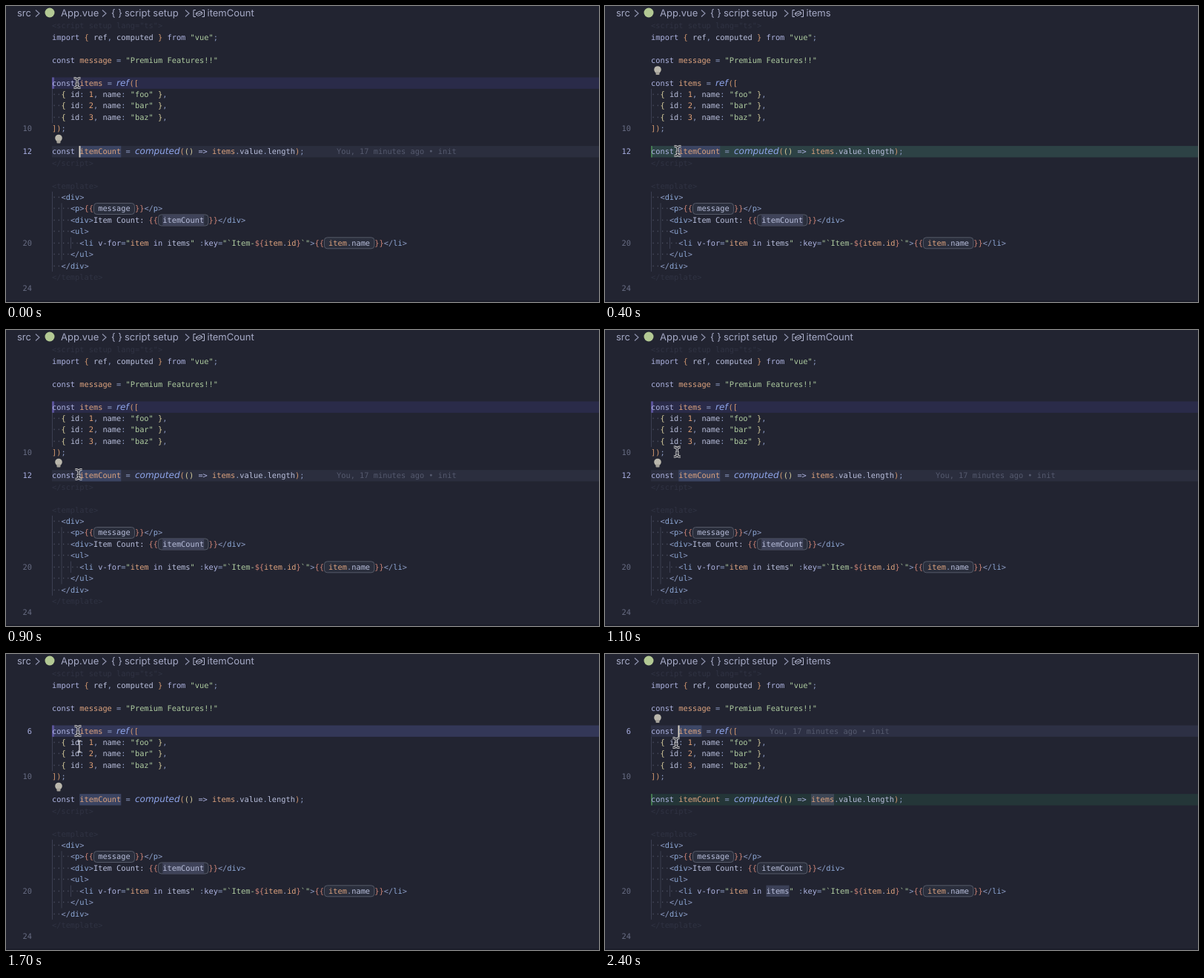
Recreate the animation shown at these times as an HTML page. Size 800 by 400 pixels, loop 2.5 s.

```html
<!DOCTYPE html>
<html lang="en">
<head>
<meta charset="utf-8">
<title>Editor</title>
<style>
html, body { margin: 0; width: 100%; height: 100%; overflow: hidden; background: #222431; }
svg { display: block; }
text { font: 10.33px "DejaVu Sans Mono", monospace; white-space: pre; text-rendering: geometricPrecision; fill: #b9bfdc; }
.ui { font: 13px Inter, sans-serif; fill: #a6aac6; }
.f { font: italic 12px "DejaVu Sans", sans-serif; fill: #8fa5ea; }
.k { fill: #adb3e0; }
.v { fill: #dda37e; }
.s { fill: #afcca0; }
.n { fill: #e09f76; }
.b { fill: #d3986f; }
.y { fill: #d6cc9c; }
.t { fill: #8ea9d8; }
.m { fill: #cf8577; }
.o { fill: #8d9cc4; }
.w { fill: #4a4e60; }
.d { fill: #303343; }
.g { fill: #555a6e; }
.num { fill: #686d84; text-anchor: end; }
.on { fill: #a9afe2; }
.line { fill: none; stroke: #3b3f51; }
</style>
</head>
<body>
<svg width="800" height="400" viewBox="0 0 800 400">
  <g id="back"></g>
  <g id="code"></g>
  <g id="front"></g>
</svg>
<script>
const CHAR = 6.219, LEFT = 62, STEP = 100, STEPS = 25;
const $ = id => document.getElementById(id);
const mid = row => 196.8 + (row - 12) * 15.44;
const colX = col => LEFT + col * CHAR;
const esc = s => s.replace(/&/g, '&amp;').replace(/</g, '&lt;');
const rect = (x, y, w, h, fill, more = '') =>
  `<rect x="${x}" y="${y}" width="${w}" height="${h}" fill="${fill}" ${more}/>`;
const text = (x, y, str, cls) => `<text x="${x}" y="${y}" class="${cls}">${esc(str)}</text>`;
const path = (d, more) => `<path d="${d}" fill="none" ${more}/>`;
const band = (row, x, w, fill) => rect(x, mid(row) - 7.7, w, 15.4, fill);
const word = (row, col, len, fill) => band(row, colX(col), len * CHAR, fill);
const number = (row, cls = '') => text(35, mid(row) + 3.4, String(row), 'num ' + cls);
const label = (x, str) => text(x, 14, str, 'ui');

// "@k" switches to colour class k
function line(row, x, src) {
  const [, ...parts] = src.split(/@(\w)/);
  let spans = '';
  for (let i = 0; i < parts.length; i += 2)
    spans += `<tspan class="${parts[i]}">${esc(parts[i + 1])}</tspan>`;
  return `<text x="${x}" y="${mid(row) + 3.4}">${spans}</text>`;
}

const pill = (row, col, len) =>
  rect(colX(col) + .5, mid(row) - 7.5, len * CHAR - 1, 15, '#2a2e3c', 'rx="4" stroke="#555a68"');
const guide = (x, from, to) =>
  `<path class="line" d="M${x} ${mid(from) - 7.7}V${mid(to) + 7.7}"/>`;
const chevron = x => path(`M${x} 5.5l5 4.5l-5 4.5`, 'stroke="#8f93ae" stroke-width="1.2"');

function header() {
  return label(15, 'src') + chevron(40) +
    '<circle cx="59" cy="9" r="6.5" fill="#b3c994"/>' +
    label(74, 'App.vue') + chevron(130) +
    label(142, '{ }') + label(160, 'script setup') + chevron(242) +
    path('M256 5.5h-3v9h3M264.5 5.5h3v9h-3M256.5 9.5l5-2.5l3 1.5v2.5l-5 2.5l-3-1.5zl3 1.5l5-2.5',
      'stroke="#b4b8d2"');
}

const item = (id, name) =>
  `@w··@y{ @xid@o: @n${id}@o, @xname@o: @s"${name}" @y}@o,`;

function code() {
  return header() + [10, 20, 24].map(r => number(r)).join('') +
    guide(62.5, 7, 9) + guide(62.5, 16, 22) + guide(75, 17, 21) + guide(87.5, 20, 20) +
    line(1, LEFT, '@d<script setup lang="ts">') +
    line(2, LEFT, '@kimport @b{ @xref@o, @xcomputed @b} @kfrom @s"vue"@o;') +
    line(4, LEFT, '@kconst @vmessage @o= @s"Premium Features!!"') +
    line(6, LEFT, '@kconst @vitems @o= @fref') + line(6, 166.5, '@b([') +
    ['foo', 'bar', 'baz'].map((n, i) => line(7 + i, LEFT, item(i + 1, n))).join('') +
    line(10, LEFT, '@b])@o;') +
    line(12, LEFT, '@kconst @vitemCount @o= @fcomputed') +
    line(12, 234.5, '@b(@y() @k=> @vitems@o.@xvalue@o.@xlength@b)@o;') +
    line(13, LEFT, '@d</' + 'script>') +
    line(15, LEFT, '@d<template>') +
    line(16, LEFT, '@w··@o<@tdiv@o>') +
    line(17, LEFT, '@w····@o<@tp@o>@m{{@x message @m}}@o</@tp@o>') +
    line(18, LEFT, '@w····@o<@tdiv@o>@xItem Count: @m{{@x itemCount @m}}@o</@tdiv@o>') +
    line(19, LEFT, '@w····@o<@tul@o>') +
    line(20, LEFT, '@w······@o<@tli @kv-for@o=@s"@vitem @kin @xitems@s" @o:@kkey@o=@s"`Item-@m${@vitem@o.@vid@m}@s`"@o>' +
      '@m{{@v item@o.@xname @m}}@o</@tli@o>') +
    line(21, LEFT, '@w····@o</@tul@o>') +
    line(22, LEFT, '@w··@o</@tdiv@o>') +
    line(23, LEFT, '@d</template>') +
    rect(0, 398, 800, 2, '#1c1e2a');
}

// Row holding the caret: it alternates between 6 and 12 on each click
const rowAt = s => s < 1 || (s >= 4 && s < 17) ? 12 : 6;

const track = [[0, 96, 104], [2, 97, 104], [4, 98, 196], [9, 98, 195], [10, 98, 195],
  [13, 96, 104], [17, 97, 104], [22, 97, 104], [23, 96, 110], [24, 96, 120]];
function pointer(s) {
  const i = Math.max(1, track.findIndex(p => p[0] >= s));
  const [a, ax, ay] = track[i - 1], [b, bx, by] = track[i];
  const u = (s - a) / (b - a);
  return [ax + (bx - ax) * u, ay + (by - ay) * u];
}

const BEAM = 'M-4.5-6.5Q0-6.5 0-3.5V3.5Q0 6.5-4.5 6.5M4.5-6.5Q0-6.5 0-3.5M0 3.5Q0 6.5 4.5 6.5M-2.5 1.5H2.5';

function backdrop(row, linked, focus) {
  const strong = row === linked, six = linked === 6;
  const fill = six ? (strong ? '#333757' : '#2a2b49') : (strong ? '#2d4245' : '#243638');
  let out = strong ? '' : band(row, LEFT, 738, row === 6 ? '#2d3044' : '#2b2e3e');
  out += band(linked, LEFT, 738, fill) + band(linked, LEFT, six ? 3 : 2, six ? '#5a5399' : '#437a50');
  out += pill(17, 9, 9) + pill(18, 23, 11) + pill(20, 59, 11);
  if (focus === 12) out += word(12, 6, 9, '#3b4462') + word(18, 24, 9, '#3f4359');
  else out += word(6, 6, 5, '#3d4766') + band(12, 278, 31, '#3d4655') + word(20, 25, 5, '#3b4057');
  return out;
}

function overlay(s, row, settled) {
  const y = settled === 12 ? 178.5 : 86;
  let out = label(271.5, settled === 12 ? 'itemCount' : 'items') + number(row, 'on') +
    `<circle cx="71" cy="${y}" r="4.8" fill="#bab7ac"/>` + rect(68.5, y + 3, 5, 4, '#a5a299', 'rx="1"');
  if (row === settled && row === rowAt(s - 2))
    out += text(row === 12 ? 446 : 222, mid(row) + 3.4, 'You, 17 minutes ago • init', 'g');
  if ([0, 3, 13, 14, 15, 16, 23, 24].includes(s)) out += band(row, 98.5, 2, '#d6d0c4');
  if (s === 17)
    out += path('M96.5 117.5h5M99 117.5v15M96.5 132.5h5', 'stroke="#c9cad2" stroke-width="1.4"');
  const [px, py] = pointer(s);
  return out + `<g transform="translate(${px} ${py})">` +
    path(BEAM, 'stroke="#d9d8d6" stroke-width="3.2"') + path(BEAM, 'stroke="#282a36" stroke-width="1.2"') + '</g>';
}

let shown = -1;
function frame(now) {
  const s = Math.floor(now / STEP) % STEPS;
  if (s !== shown) {
    shown = s;
    const row = rowAt(s), settled = rowAt(s - 1);
    $('back').innerHTML = backdrop(row, 18 - settled, s === 4 ? row : settled);
    $('front').innerHTML = overlay(s, row, settled);
  }
  requestAnimationFrame(() => frame(performance.now() - start));
}

$('code').innerHTML = code();
const start = performance.now();
frame(0);
</script>
</body>
</html>
```
